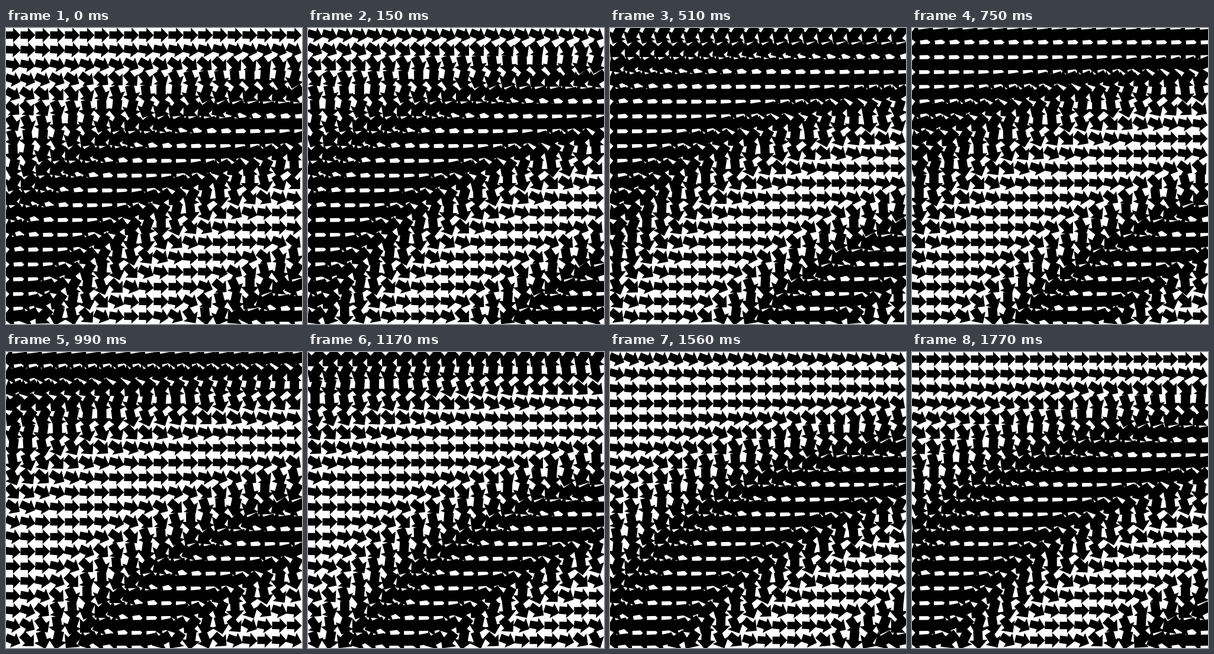
An HTML page with a canvas that plays this animation: 500 by 500 pixels, repeating every 1.8 s.

```html
<!DOCTYPE html>
<html>
<head>
<meta charset="utf-8">
<style>
html, body { margin: 0; width: 100%; height: 100%; overflow: hidden; background: #fff; }
canvas { display: block; }
</style>
</head>
<body>
<canvas id="stage" width="500" height="500"></canvas>
<script>
const ctx = document.getElementById('stage').getContext('2d');
const CELL = 25, SIZE = 500, LOOP = 1800, STEP = 30;
const RAD = Math.PI / 180;

// Arrow pointing right; black and white arrows interlock at scale 1.
const arrow = new Path2D('M-12.5-6.25H0V-12.5L12.5 0 0 12.5V6.25H-12.5Z');

function draw(ms) {
  ctx.setTransform(1, 0, 0, 1, 0, 0);
  ctx.fillStyle = '#fff';
  ctx.fillRect(0, 0, SIZE, SIZE);
  ctx.fillStyle = '#000';
  for (let y = 12; y < SIZE; y += CELL) {
    for (let x = 12; x < SIZE; x += CELL) {
      // The wave gets shorter from left to right.
      const phase = 360 * ms / LOOP + y * (0.4 + 0.00153 * x);
      const turn = (1 - Math.cos(phase * RAD)) / 2;
      const scale = 1 + turn / 2;
      ctx.setTransform(scale, 0, 0, scale, x, y);
      ctx.rotate(turn * Math.PI);
      ctx.fill(arrow);
    }
  }
}

const start = performance.now();
function tick() {
  const ms = (performance.now() - start) % LOOP;
  draw(Math.floor(ms / STEP) * STEP);
  requestAnimationFrame(tick);
}
tick();
</script>
</body>
</html>
```
